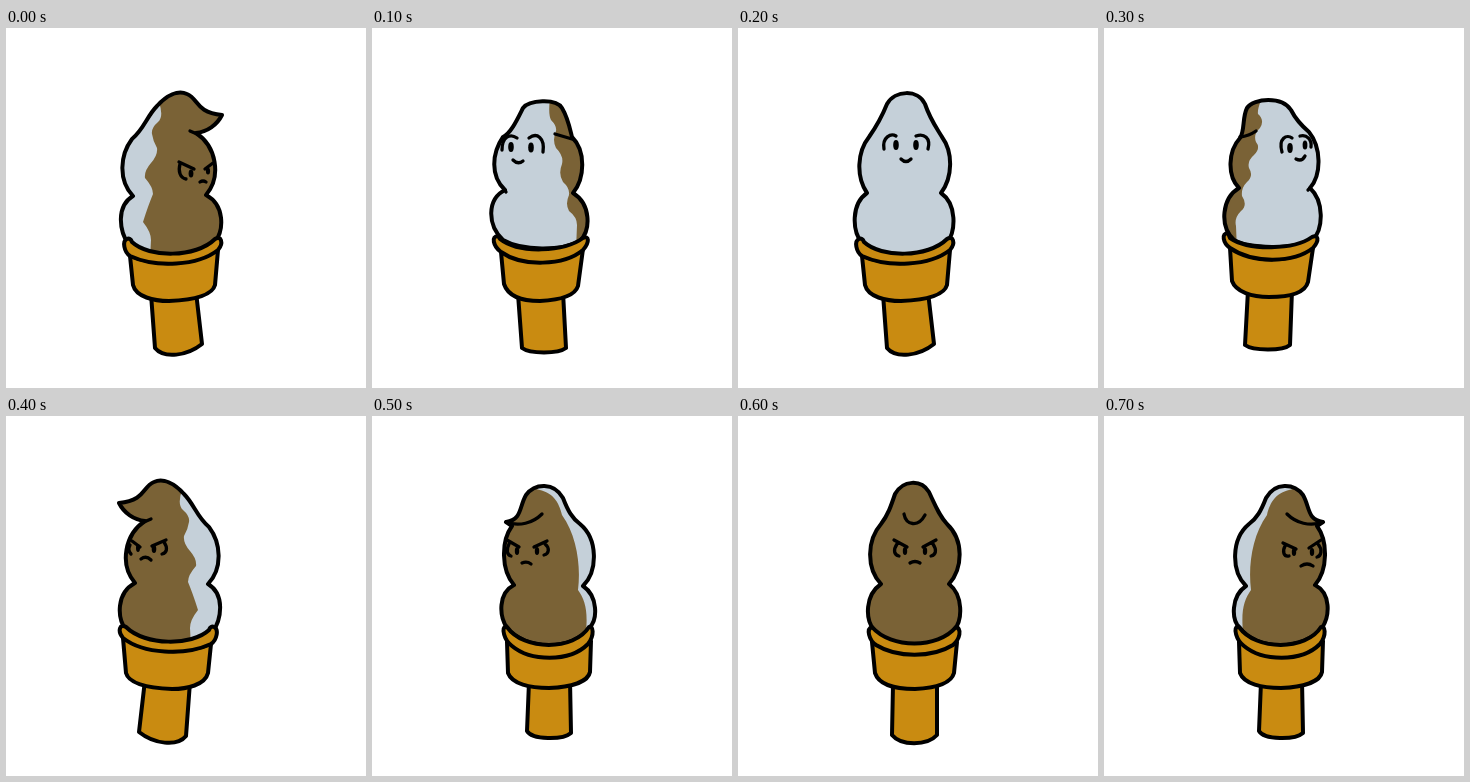
An HTML page that plays this animation: 360 px wide and 360 px high, repeating every 800 ms.

```html
<!DOCTYPE html>
<html lang="en">
<head>
<meta charset="utf-8">
<title>Turning swirl cone</title>
<style>
html, body { margin: 0; width: 100%; height: 100%; overflow: hidden; background: #fff; }
svg { display: block; width: 100vw; height: 100vh; }
.ink { fill: none; stroke: #000; stroke-width: 4; stroke-linecap: round; stroke-linejoin: round; }
.thin { stroke-width: 3.3; }
</style>
</head>
<body>
<svg id="stage" viewBox="0 0 360 360"></svg>
<script>
const MILK = '#c5d0d9', COCOA = '#7a6236', WAFER = '#c98b11';
const STEP = 100;

// Swirl shapes: outline, second flavour and loose crease lines
const swirls = {
  curl: {
    body: 'M151 78C161 67 172 62 181 66C193 71 189 84 216 87C211 97 201 104 190 105C210 118 216 148 200 167C219 177 218 202 209 214C190 232 140 232 123 217C113 203 110 178 127 168C112 152 114 127 126 111C138 101 141 88 151 78Z',
    base: COCOA, side: MILK,
    patch: 'M153 74Q158 89 152 94Q145 100 146 106Q147 113 151 120Q152 127 145 135Q138 143 139 150Q147 159 147 166Q142 178 137 194Q145 204 145 212L144 232H100V74Z',
    lines: 'M184 103L191 106'
  },
  milkLeft: {
    body: 'M151 80C157 72 184 70 190 80C196 90 198 101 200 109C214 123 213 150 201 165C219 176 219 202 208 213C190 223 150 223 131 212C115 197 115 171 133 162C118 148 120 125 131 109C139 105 145 92 151 80Z',
    base: MILK, side: COCOA,
    patch: 'M178 70Q176 86 179 92Q185 98 184 103Q180 112 184 120Q192 128 190 136Q186 146 191 154Q198 160 197 167Q193 176 197 183Q205 189 205 197L204 222H230V70Z',
    lines: 'M183 106L200 111M133 162L134 164'
  },
  milkFront: {
    body: 'M149 76C157 62 180 61 187 76C192 91 198 99 204 109C215 124 215 149 203 165C219 176 218 203 209 215C190 230 140 230 124 215C114 203 113 176 129 165C118 149 119 124 131 109C138 99 143 91 149 76Z',
    base: MILK, side: MILK, patch: '', lines: ''
  },
  milkRight: {
    body: 'M143 80C150 70 178 68 187 82C192 92 198 98 205 104C217 119 218 146 206 160C220 173 220 201 208 213C190 221 145 221 130 212C115 198 118 170 135 160C123 148 124 123 136 110C141 103 138 90 143 80Z',
    base: MILK, side: COCOA,
    patch: 'M160 66Q153 80 154 86Q161 92 156 100Q149 106 152 114Q157 120 150 127Q143 133 145 140Q150 148 143 154Q137 160 138 168Q144 177 137 183Q130 190 132 198L133 222H100V66Z',
    lines: 'M136 109Q145 108 152 103M206 160L204 162'
  },
  cocoaTurn: {
    body: 'M154 79C163 67 182 66 191 82C196 95 200 102 208 108C226 123 226 155 211 170C226 180 226 204 217 212C201 235 153 234 135 212C127 200 126 177 142 169C129 154 129 125 140 110L134 106C150 104 147 91 154 79Z',
    base: COCOA, side: MILK,
    patch: 'M163 66L164 73C181 76 187 86 190 99C205 120 209 150 206 174C213 184 216 194 214 216H240V66Z',
    lines: 'M134 106C147 111 161 107 170 98'
  },
  cocoaFront: {
    body: 'M157 78C165 64 183 63 191 76C198 91 201 99 209 108C226 124 225 152 211 168C225 179 225 204 216 214C198 234 153 234 136 214C127 203 127 179 143 168C128 152 129 124 143 108C150 99 153 90 157 78Z',
    base: COCOA, side: COCOA, patch: '',
    lines: 'M166 98C168 109 180 112 187 99'
  }
};

// Wafer shapes: stem, cup and rim
const cones = {
  tall: [
    'M145 266L149 320C158 331 181 328 196 316L190 264Z',
    'M124 228L127 257C130 269 148 273 163 273C186 272 206 268 209 257L212 222Q168 245 124 228Z',
    'M121 211C116 213 118 224 124 228C150 240 192 238 212 222C218 215 215 207 209 211C190 230 143 230 126 214C125 211 123 210 121 211Z'
  ],
  left: [
    'M146 266L150 320C158 326 186 326 194 320L191 264Z',
    'M129 224L132 256C136 268 150 273 168 273C188 272 203 268 206 258L211 221Q170 245 129 224Z',
    'M126 208C119 208 121 218 129 224C150 239 192 238 211 222C218 214 217 207 211 210C192 224 147 226 128 211Z'
  ],
  right: [
    'M144 262L141 317C149 323 179 323 186 317L188 262Z',
    'M126 220L128 253C132 264 148 269 165 269C186 269 201 265 204 254L209 220Q168 243 126 220Z',
    'M124 205C117 205 119 215 126 220C149 236 190 235 209 220C216 212 214 206 208 209C190 222 145 223 126 210Z'
  ],
  turn: [
    'M157 266L155 315C160 324 191 324 199 317L198 264Z',
    'M135 226L136 257C140 268 158 272 177 272C199 271 216 266 218 256L219 225Q178 252 135 226Z',
    'M134 210C129 212 132 224 140 230C158 245 197 247 216 228C223 219 221 209 217 211C202 235 152 235 135 211Z'
  ],
  front: [
    'M155 268L154 319C163 330 189 330 199 319L199 268Z',
    'M134 226L137 257C141 269 158 273 177 273C197 272 213 268 216 257L219 226Q177 248 134 226Z',
    'M134 211C128 213 131 224 138 229C159 242 194 242 215 229C222 223 224 213 218 211C200 233 153 233 134 211Z'
  ]
};

// Eyes are [x, y, rx, ry]
const poses = [
  { swirl: 'curl', cone: 'tall', eyes: [[185, 145.5, 2.4, 4], [202, 143, 2.1, 3.6]],
    face: 'M173 134L188 141M207 135L199 141M174 136C172 143 174 150 180 151M194 154Q197 152 200 154' },
  { swirl: 'milkLeft', cone: 'left', eyes: [[139, 119, 2.8, 5], [159, 119.5, 2.8, 5]],
    face: 'M130 122C130 109 138 105 145 110M157 110C165 104 173 110 171 124M141 132Q146 137 151 133' },
  { swirl: 'milkFront', cone: 'tall', eyes: [[158, 117, 2.8, 5], [178, 117, 2.8, 5]],
    face: 'M146 121C144 109 153 105 158 108M178 108C186 105 193 110 190 121M163 131Q168 136 173 131' },
  { swirl: 'milkRight', cone: 'right', eyes: [[186, 120, 2.8, 5], [201, 117, 2.4, 4.6]],
    face: 'M178 124C174 110 183 106 188 110M196 108C203 106 208 112 207 119M192 131Q198 134 201 128' },
  { swirl: 'curl', cone: 'tall', flip: 329, flipCone: 329, eyes: [[132, 132, 2, 4], [148, 133, 2.3, 4]],
    face: 'M126 125L134 131M160 124L146 130M124 129C122 133 123 136 125 138M158 126C162 132 161 137 156 138M135 143Q140 139 145 144' },
  { swirl: 'cocoaTurn', cone: 'turn', eyes: [[145, 135, 2.2, 4], [165, 135, 2.2, 4]],
    face: 'M135 124L147 131M175 125L162 131M137 128C134 134 135 139 139 140M173 128C178 132 177 138 172 139M150 147Q155 145 159 148' },
  { swirl: 'cocoaFront', cone: 'front', eyes: [[167, 135, 2.2, 4], [187, 135, 2.2, 4]],
    face: 'M156 124L169 131M198 124L185 131M159 128C155 134 156 139 161 140M195 128C199 134 198 139 193 140M172 147Q177 144 182 147' },
  { swirl: 'cocoaTurn', cone: 'turn', flip: 353, eyes: [[190, 136, 2.2, 4], [208, 136, 2.2, 4]],
    face: 'M179 127L192 133M217 124L205 132M181 130C178 136 180 141 185 140M214 128C219 134 217 140 213 141M197 150Q203 146 209 150' }
];

const fill = (d, color) => `<path d="${d}" fill="${color}"/>`;
const ink = (d, extra = '') => `<path class="ink ${extra}" d="${d}"/>`;
const turn = sum => sum ? ` transform="matrix(-1 0 0 1 ${sum} 0)"` : '';

function draw(pose, i) {
  const s = swirls[pose.swirl];
  const wafer = cones[pose.cone].map(d => fill(d, WAFER) + ink(d)).join('');
  const eyes = pose.eyes.map(([x, y, rx, ry]) =>
    `<ellipse cx="${x}" cy="${y}" rx="${rx}" ry="${ry}"/>`).join('');
  return `<g class="pose" opacity="0">
    <clipPath id="body${i}"><path d="${s.body}"/></clipPath>
    <g${turn(pose.flip)}>${fill(s.body, s.base)}
      <g clip-path="url(#body${i})">${fill(s.patch, s.side)}</g>
      ${ink(s.body)}${ink(s.lines, 'thin')}</g>
    <g${turn(pose.flipCone)}>${wafer}</g>
    ${eyes}${ink(pose.face, 'thin')}</g>`;
}

const stage = document.getElementById('stage');
stage.innerHTML = poses.map(draw).join('');

stage.querySelectorAll('.pose').forEach((el, i) => {
  const n = poses.length;
  const keys = Array.from({ length: n + 1 }, (_, k) => ({
    offset: k / n, opacity: k % n === i ? 1 : 0, easing: 'step-end'
  }));
  el.animate(keys, { duration: n * STEP, iterations: Infinity });
});
</script>
</body>
</html>
```
